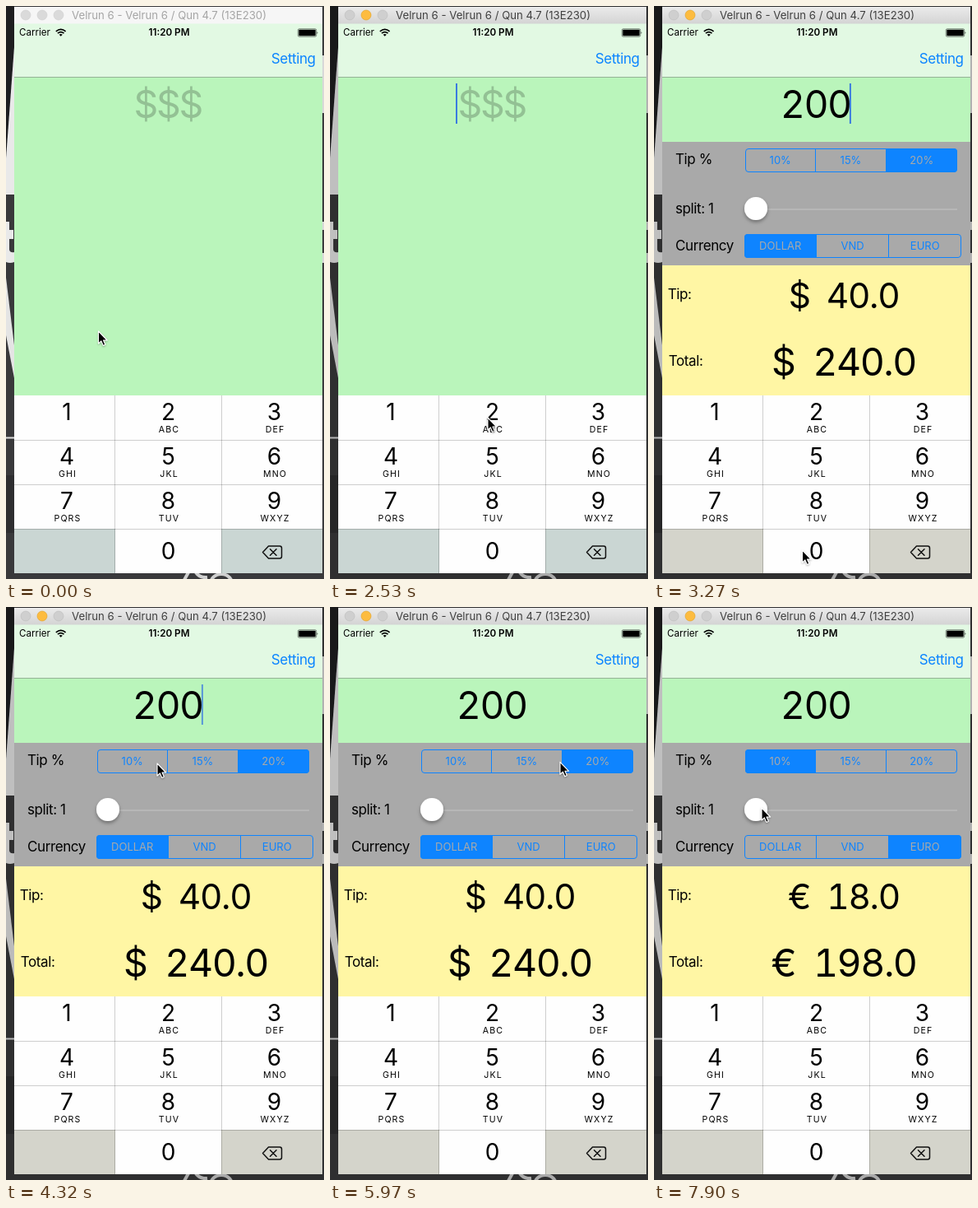
Write an HTML page that moves like this. It is 387 px wide and 696 px high and loops after 8 s.

```html
<!DOCTYPE html>
<html lang="en">
<head>
<meta charset="utf-8">
<title>Tip calculator</title>
<style>
html, body { margin: 0; width: 100%; height: 100%; overflow: hidden; background: #39393b; }
svg { display: block; width: 387px; height: 696px; }
text { font-family: Inter, Roboto, "Liberation Sans", sans-serif; white-space: pre; }
.mid { text-anchor: middle; }
.label { font-size: 17px; letter-spacing: -.4px; }
.big { font-size: 46.5px; letter-spacing: -1.5px; font-variant-numeric: tabular-nums; }
.tip { font-size: 42.4px; letter-spacing: -1.3px; font-variant-numeric: tabular-nums; }
.seg { font-size: 13px; }
.digit { font-size: 28px; }
.letters { font-size: 10.6px; letter-spacing: 1.1px; }
</style>
</head>
<body>
<svg id="stage" viewBox="0 0 387 696" xmlns="http://www.w3.org/2000/svg">
  <defs>
    <linearGradient id="bar" x2="0" y2="1">
      <stop stop-color="#ebebeb"/><stop offset="1" stop-color="#d3d3d3"/>
    </linearGradient>
    <filter id="soft" x="-50%" y="-50%" width="200%" height="200%">
      <feDropShadow dx="0" dy="2.5" stdDeviation="2" flood-opacity=".35"/>
    </filter>
    <filter id="faint" x="-50%" y="-50%" width="200%" height="200%">
      <feDropShadow dx="0" dy="1" stdDeviation=".8" flood-opacity=".35"/>
    </filter>
  </defs>

  <g id="desktop">
    <rect width="387" height="696" fill="#39393b"/>
    <path d="M0 0H10V50L0 185Z" fill="#1e1e20"/>
    <path d="M10 50V229H0V185Z" fill="#e9e9e9"/>
    <path d="M0 262H4V272H9V283H4V296Q5 300 10 299V311Q5 313 0 311Z" fill="#e9e9e9"/>
    <path d="M0 330L10 412V452L0 400Z" fill="#e4e4e4"/>
    <path d="M0 524.5H10" stroke="#ddd" stroke-width="2"/>
    <path d="M0 570H10V640H0Z" fill="#2e2e30"/>
    <path d="M385 60H387V130H385ZM385 262H387V272H385ZM385 300H387V312H385Z" fill="#d8d8d8"/>
    <path d="M217 697L222 688M231 688Q236 695 245 694M250 697Q254 690 262 690T274 697" fill="none" stroke="#d0d0d0" stroke-width="4"/>
    <rect id="shade" width="387" height="696"/>
  </g>

  <rect id="titlebar" x="10" y="1" width="375" height="21"/>
  <g id="dots" stroke-width=".6"></g>
  <text id="title" class="mid" x="198.5" y="16" font-size="13.2">Velrun 6 - Velrun 6 / Qun 4.7 (13E230)</text>

  <rect x="10" y="21.5" width="375" height="65" fill="#e2f9e3"/>
  <rect x="10" y="87" width="375" height="386" fill="#baf5bb"/>
  <path d="M10 86.5H385" stroke="#95b396"/>
  <text x="16" y="36.3" font-size="11.6">Carrier</text>
  <g fill="none" stroke="#000" stroke-width="1.7">
    <path d="M60.8 30.8Q66.7 25.8 72.6 30.8M62.9 33.2Q66.7 30 70.5 33.2"/>
    <path d="M66.7 36.8L64.6 34.7Q66.7 33.3 68.8 34.7Z" fill="#000" stroke="none"/>
  </g>
  <text class="mid" x="198.5" y="36.3" font-size="11.7" font-weight="600">11:20 PM</text>
  <rect x="355.3" y="27.8" width="22.4" height="9.4" rx="1.6" fill="none" stroke="#000" stroke-width=".5"/>
  <rect x="356.3" y="28.8" width="20.4" height="7.4" rx=".8"/>
  <path d="M378.6 31Q380.2 32.5 378.6 34Z"/>
  <text class="label" x="376.6" y="70" text-anchor="end" fill="#0a84ff">Setting</text>

  <g id="panel">
    <rect class="fade" x="10" y="165" width="375" height="252" fill="#a9a9a9"/>
    <rect class="fade" x="10" y="315" width="375" height="158" fill="#fff6a4"/>
    <g id="form" class="fade">
      <text class="label" x="26" y="192">Tip %</text>
      <text class="label" x="26" y="252">split: 1</text>
      <text class="label" x="26" y="297">Currency</text>
      <text class="label" x="16.8" y="356">Tip:</text>
      <text class="label" x="17.8" y="436.5">Total:</text>
      <path d="M112 247H369" stroke="#b7b7b7" stroke-width="2"/>
      <circle cx="124" cy="246" r="14" fill="#fff" filter="url(#soft)"/>
    </g>
    <text id="tip" class="tip mid" x="231" y="367"></text>
    <text id="total" class="big mid" x="231" y="449"></text>
  </g>

  <text id="amount" class="big mid" x="196.8" y="136"></text>
  <rect id="caret" y="94" width="2" height="49" fill="#3a7be0"/>
  <g id="keypad"></g>
  <g id="mouse" filter="url(#faint)">
    <path d="M0 0V15L3.4 11.9L5.8 17.4L8.3 16.3L6 11H10.6Z" stroke="#fff" stroke-width="1.1" stroke-linejoin="round"/>
  </g>
</svg>
<script>
const LOOP = 8000, TICK = 149.2, LEAD = 14;
const BLUE = [14, 132, 255], GRAY = [169, 169, 169];
const $ = id => document.getElementById(id);

function add(parent, tag, attrs, text) {
  const el = document.createElementNS("http://www.w3.org/2000/svg", tag);
  for (const name in attrs) el.setAttribute(name, attrs[name]);
  if (text !== undefined) el.textContent = text;
  parent.appendChild(el);
  return el;
}
const set = (el, attrs) => { for (const name in attrs) el.setAttribute(name, attrs[name]); };
const mix = (a, b, u) => `rgb(${a.map((v, i) => Math.round(v + (b[i] - v) * u))})`;
const clamp = u => Math.max(0, Math.min(1, u));
const smooth = u => { u = clamp(u); return u * u * (3 - 2 * u); };

const dots = [24, 44, 64].map(cx => add($("dots"), "circle", { cx, cy: 11, r: 6 }));

// Segmented control: edges are the outer sides and the dividers.
function segmented(edges, y, labels) {
  const form = $("form"), left = edges[0], width = edges[3] - left;
  const cells = labels.map((label, i) => {
    const a = edges[i], b = edges[i + 1], r = 4;
    const d = i === 0 ? `M${b} ${y}H${a + r}Q${a} ${y} ${a} ${y + r}V${y + 29 - r}Q${a} ${y + 29} ${a + r} ${y + 29}H${b}Z`
      : i === 2 ? `M${a} ${y}H${b - r}Q${b} ${y} ${b} ${y + r}V${y + 29 - r}Q${b} ${y + 29} ${b - r} ${y + 29}H${a}Z`
      : `M${a} ${y}H${b}V${y + 29}H${a}Z`;
    return {
      fill: add(form, "path", { d, fill: mix(BLUE, BLUE, 0) }),
      text: add(form, "text", { class: "seg mid", x: (a + b) / 2, y: y + 19.2 }, label)
    };
  });
  const line = { fill: "none", stroke: mix(BLUE, BLUE, 0) };
  add(form, "rect", { x: left + .5, y: y + .5, width: width - 1, height: 28, rx: 3.5, ...line });
  add(form, "path", { d: `M${edges[1]} ${y}v29M${edges[2]} ${y}v29`, ...line });
  return cells;
}
const tipCells = segmented([111, 196.5, 282.5, 369], 173, ["10%", "15%", "20%"]);
const moneyCells = segmented([110, 197.5, 285.5, 374], 277, ["DOLLAR", "VND", "EURO"]);

const pad = $("keypad");
const sideKeys = [10, 262].map(x => add(pad, "rect", { x, y: 635, width: 123, height: 54 }));
add(pad, "path", { d: "M10 473H385V635H262V689H133V635H10Z", fill: "#fefefe" });
add(pad, "path", {
  d: "M132.5 473V689M262.5 473V689M10 527.5H385M10 581.5H385M10 635.5H385",
  stroke: "#000", "stroke-opacity": .19
});
["", "ABC", "DEF", "GHI", "JKL", "MNO", "PQRS", "TUV", "WXYZ"].forEach((letters, i) => {
  const x = [74, 197.5, 326.5][i % 3], y = 503 + 54 * Math.floor(i / 3);
  add(pad, "text", { class: "digit mid", x, y }, i + 1);
  add(pad, "text", { class: "letters mid", x: x + 1, y: y + 15 }, letters);
});
add(pad, "text", { class: "digit mid", x: 197.5, y: 672 }, 0);
add(pad, "path", {
  d: "M319.5 656H333Q335.5 656 335.5 658.5V668.5Q335.5 671 333 671H319.5L312.5 663.5ZM321.5 659.8L329 667.3M329 659.8L321.5 667.3",
  fill: "none", stroke: "#111", "stroke-width": 1.5, "stroke-linejoin": "round", "stroke-linecap": "round"
});

// Pointer stops: tick, x, y.
const stops = [
  [9, 112.5, 395], [12, 145.5, 510], [14, 192, 500], [17, 192, 500], [19, 180.5, 661],
  [25, 180.5, 661], [29, 184, 190], [31, 184, 190], [33, 226.5, 190.5], [35, 226.5, 190.5],
  [38, 322, 188], [39, 322, 188], [42, 160, 189], [43, 160, 189], [46, 304, 276.5],
  [47, 316, 284], [49, 316, 284], [53, 131, 244]
];
function pointer(k) {
  const i = stops.findIndex(s => s[0] >= k);
  if (i === 0) return stops[0].slice(1);
  const [k0, x0, y0] = stops[i - 1], [k1, x1, y1] = stops[i];
  const u = smooth((k - k0) / (k1 - k0));
  return [x0 + (x1 - x0) * u, y0 + (y1 - y0) * u];
}

// Choices: tick, chosen cell.
const tipClicks = [[0, 2], [31, 0], [35, 1], [38, 2], [42, 0]];
const moneyClicks = [[0, 0], [48, 2]];

function choose(cells, clicks, k) {
  const n = clicks.filter(c => c[0] <= k).length - 1;
  const [start, now] = clicks[n], before = n ? clicks[n - 1][1] : -1;
  const changing = n > 0 && k === start;
  cells.forEach((cell, i) => {
    const level = i === now ? (changing ? .78 : 1) : i === before && changing ? .45 : 0;
    set(cell.fill, { opacity: level });
    set(cell.text, { fill: mix(BLUE, GRAY, level === 1 ? 1 : level * .6) });
  });
  return now;
}

function caretLevel(k) {
  if (k >= 17 && k < 25) return 1;
  const phase = (k * TICK - (k < 17 ? 270 : 228) + 1000) % 1000;
  return Math.min(clamp(phase / 130), clamp((680 - phase) / 150));
}

function draw(ms) {
  const k = Math.floor((ms + LEAD) / TICK);
  const active = k >= 15;
  set($("titlebar"), { fill: active ? "url(#bar)" : "#f6f6f6" });
  set($("title"), { fill: active ? "#404040" : "#a5a5a5" });
  set($("shade"), { opacity: active ? .18 : 0 });
  dots.forEach((dot, i) => set(dot, active && i === 1
    ? { fill: "#fdbc40", stroke: "#dfa023" }
    : { fill: active ? "#cfcfcf" : "#dadada", stroke: active ? "#bcbcbc" : "#cecece" }));

  const typed = k >= 22 ? "200" : k >= 20 ? "20" : k >= 18 ? "2" : "";
  const amount = $("amount");
  amount.textContent = typed || "$$$";
  set(amount, { fill: typed ? "#000" : "#93c194" });
  amount.style.letterSpacing = typed ? "" : "-2.3px";
  set($("caret"), { x: typed ? 196.8 + typed.length * 13.7 : 153, opacity: caretLevel(k) });

  const rate = [.1, .15, .2][choose(tipCells, tipClicks, k)];
  const euro = choose(moneyCells, moneyClicks, k) === 2;
  const base = typed * (euro ? .9 : 1), sign = euro ? "€" : "$";
  $("tip").textContent = `${sign}  ${(base * rate).toFixed(1)}`;
  $("total").textContent = `${sign}  ${(base * (1 + rate)).toFixed(1)}`;

  const shown = smooth((k - 17.5) / 2.8);
  document.querySelectorAll(".fade").forEach(el => set(el, { opacity: shown }));
  for (const id of ["tip", "total"]) set($(id), { opacity: shown ** 1.4 });
  sideKeys.forEach(key => set(key, { fill: mix([202, 214, 211], [212, 212, 203], shown) }));

  set($("mouse"), { transform: `translate(${pointer(k)})` });
}

function frame(now) {
  draw(now % LOOP);
  requestAnimationFrame(frame);
}
draw(0);
requestAnimationFrame(frame);
</script>
</body>
</html>
```
